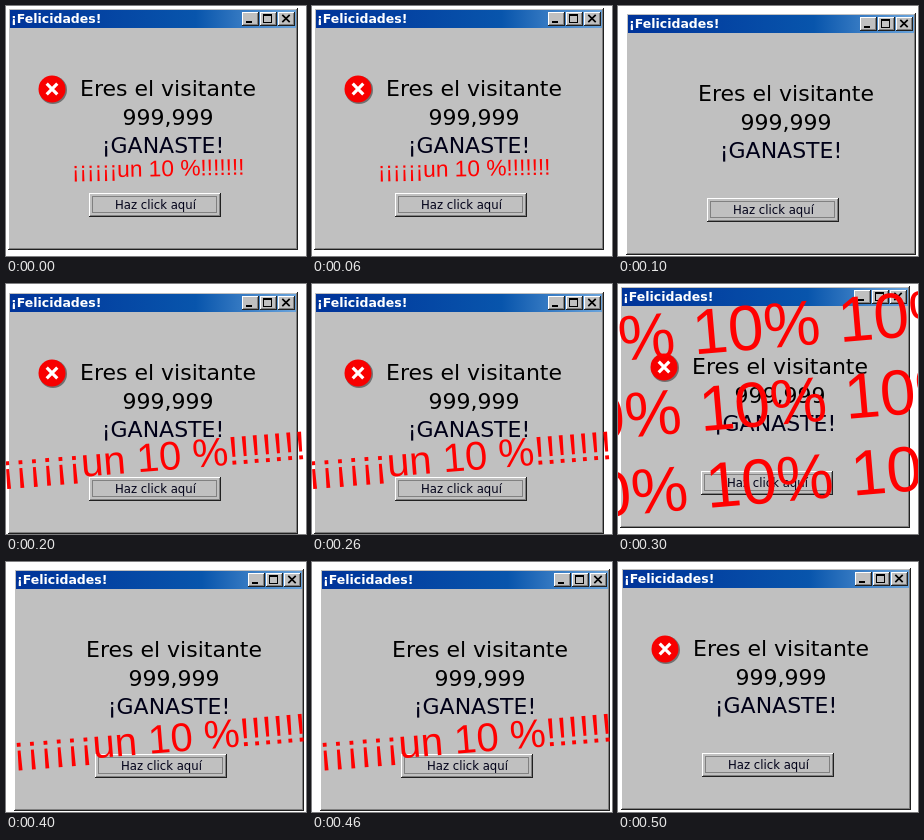
An HTML page with a canvas that plays this animation: 300x250 px, repeating every 600 ms.

```html
<!DOCTYPE html>
<html lang="es">
<head>
<meta charset="utf-8">
<style>
html, body { margin: 0; height: 100%; overflow: hidden; background: #fff; }
canvas { display: block; }
</style>
</head>
<body>
<canvas width="300" height="250"></canvas>
<script>
const c = document.querySelector('canvas').getContext('2d');
const SANS = '"DejaVu Sans", Verdana, sans-serif';
const ARIAL = '"Liberation Sans", Arial, sans-serif';
const PRIZE = '¡¡¡¡¡¡un 10 %!!!!!!!';

// Window position, error icon, and red banner [x, baseline, size, angle]
const poses = [
  { x: 0, y: 0, icon: true, banner: [66, 172, 22.7, -0.02] },
  { x: 6, y: 5 },
  { x: 0, y: 6, icon: true, banner: [-4, 199, 40.2, -0.079] },
  { x: 0, y: 0, icon: true, tiles: true },
  { x: 6, y: 5, banner: [7.5, 202.5, 40.2, -0.079] },
  { x: 1, y: 4, icon: true }
];

function rect(x, y, w, h, color) {
  c.fillStyle = color;
  c.fillRect(x, y, w, h);
}

function bevel(x, y, w, h) {
  rect(x, y, w, h, '#202020');
  rect(x, y, w - 1, h - 1, '#fff');
  rect(x + 1, y + 1, w - 2, h - 2, '#808080');
  rect(x + 1, y + 1, w - 3, h - 3, '#c0c0c0');
}

function text(s, x, y, font, color, align = 'center') {
  c.font = font;
  c.fillStyle = color;
  c.textAlign = align;
  c.fillText(s, x, y);
}

function disc(x, y, r, color) {
  c.fillStyle = color;
  c.beginPath();
  c.arc(x, y, r, 0, 7);
  c.fill();
}

function cross(x, y, r, color, width) {
  c.strokeStyle = color;
  c.lineWidth = width;
  c.beginPath();
  for (const side of [-1, 1]) {
    c.moveTo(x - r * side, y - r);
    c.lineTo(x + r * side, y + r);
  }
  c.stroke();
}

function titleBar() {
  const blue = c.createLinearGradient(4, 0, 290, 0);
  blue.addColorStop(0, '#003399');
  blue.addColorStop(0.65, '#0855ac');
  blue.addColorStop(1, '#6aa4dc');
  rect(4, 4, 286, 18, blue);
  text('¡Felicidades!', 5, 17, 'bold 12.5px ' + SANS, '#fff', 'left');
  for (const x of [236, 254, 272]) bevel(x, 6, 17, 14);
  rect(240, 15, 6, 2, '#000');
  rect(257, 8, 9, 9, '#000');
  rect(258, 10, 7, 6, '#c0c0c0');
  cross(280, 12.5, 3.7, '#000', 1.7);
}

function errorIcon() {
  disc(47, 84, 14, '#707070');
  disc(46, 83, 13.5, '#f80000');
  cross(46, 83, 5.3, '#fff', 3.2);
}

function button() {
  bevel(83, 187, 132, 24);
  c.strokeStyle = '#404040';
  c.lineWidth = 1;
  c.setLineDash([1, 1]);
  c.strokeRect(86.5, 190.5, 124, 16);
  c.setLineDash([]);
  text('Haz click aquí', 149.5, 203, '11.7px ' + SANS, '#000018');
}

function dialog(icon) {
  bevel(2, 2, 290, 242);
  titleBar();
  if (icon) errorIcon();
  const big = '22px ' + SANS;
  text('Eres el visitante', 162, 90, big, '#000');
  text('999,999', 162, 119, big, '#000');
  text('¡GANASTE!', 157, 147, big, '#000018');
  button();
}

function slanted(x, y, angle, paint) {
  c.save();
  c.translate(x, y);
  c.rotate(angle);
  paint();
  c.restore();
}

function red(s, x, y, size) {
  text(s, x, y, size + 'px ' + ARIAL, '#f00', 'left');
}

function draw(now) {
  const p = poses[Math.floor(now / 100) % poses.length];
  rect(0, 0, 300, 250, '#fff');
  slanted(p.x, p.y, 0, () => dialog(p.icon));
  if (p.banner) {
    const [x, y, size, angle] = p.banner;
    slanted(x, y, angle, () => red(PRIZE, 0, 0, size));
  }
  if (p.tiles) slanted(-69, 83, -0.085, () => {
    for (const row of [0, 1, 2]) red('10% 10% 10%', 0, row * 77, 64);
  });
}

const start = performance.now();
function tick() {
  draw(performance.now() - start);
  requestAnimationFrame(tick);
}
tick();
</script>
</body>
</html>
```
